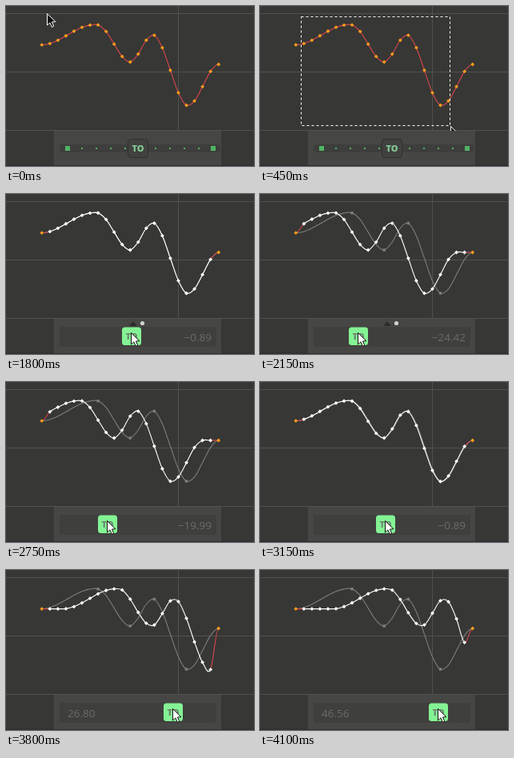
Write an HTML page with a canvas that moves like this. It is 310 by 200 pixels and loops after 4350 ms.

```html
<!DOCTYPE html>
<html lang="en">
<head>
<meta charset="utf-8">
<title>Time offset slider</title>
<style>
  html, body { margin: 0; width: 100%; height: 100%; overflow: hidden; background: #373735; }
  canvas { display: block; width: 310px; height: 200px; }
</style>
</head>
<body>
<canvas id="stage" width="310" height="200"></canvas>
<script>
const ctx = document.getElementById('stage').getContext('2d');
const LOOP = 4350, STEP = 50;
const SELECT = 900, MOVE = 1150, HOVER = 1250, PRESS = 1650, FREE = 2550;
const X0 = 44.8, GAP = 10.04, LAST = 22, CENTER = 165;
const RED = '#d8464c', ORANGE = '#f99d1c', WHITE = '#ffffff', BLACK = '#111111';
const GHOST = '#7c7c7a', GREEN = '#4fb464';
const FONT = '"Open Sans", "Noto Sans", sans-serif';

// Turning points of the curve: [key position, y]
const shape = [[0, 48.6], [6.4, 23.6], [6.9, 23.6], [11, 70], [13.8, 36], [18.2, 124.6], [22, 73]];
// Knob travel: [time, pixels from the centre]
const drag = [[1650, 0], [2150, -42], [2400, -48], [2550, -48], [2750, -38], [3500, 19], [4100, 58]];

const clamp = (v, lo, hi) => Math.min(hi, Math.max(lo, v));
const lerp = (a, b, u) => a + (b - a) * u;
const easeOut = (u, power) => 1 - (1 - clamp(u, 0, 1)) ** power;
const keyX = i => X0 + i * GAP;
const baseY = pos => track(shape, pos);

// Monotone cubic interpolation with resting ends
function track(keys, t) {
  const n = keys.length - 1;
  t = clamp(t, keys[0][0], keys[n][0]);
  let i = 0;
  while (i < n - 1 && t > keys[i + 1][0]) i++;
  const rate = k => (keys[k + 1][1] - keys[k][1]) / (keys[k + 1][0] - keys[k][0]);
  const slope = k => {
    if (k === 0 || k === n) return 0;
    const a = rate(k - 1), b = rate(k);
    return a * b <= 0 ? 0 : 2 * a * b / (a + b);
  };
  const [ta, a] = keys[i], [tb, b] = keys[i + 1], span = tb - ta;
  const u = (t - ta) / span, u2 = u * u, u3 = u2 * u;
  return a + (b - a) * (3 * u2 - 2 * u3) +
         span * (slope(i) * (u3 - 2 * u2 + u) + slope(i + 1) * (u3 - u2));
}

function curve(ys, from, to, color) {
  const slope = i => i <= 0 || i >= LAST ? 0 : (ys[i + 1] - ys[i - 1]) / 2;
  ctx.beginPath();
  ctx.moveTo(keyX(from), ys[from]);
  for (let i = from; i < to; i++) {
    ctx.bezierCurveTo(keyX(i + 1 / 3), ys[i] + slope(i) / 3,
                      keyX(i + 2 / 3), ys[i + 1] - slope(i + 1) / 3,
                      keyX(i + 1), ys[i + 1]);
  }
  ctx.strokeStyle = color;
  ctx.lineWidth = 1.1;
  ctx.stroke();
}

function polygon(x, y, points, fill) {
  ctx.beginPath();
  points.forEach(([dx, dy]) => ctx.lineTo(x + dx, y + dy));
  ctx.closePath();
  ctx.fillStyle = fill;
  ctx.fill();
}

function diamond(x, y, color) {
  const r = 2.4;
  polygon(x, y, [[0, -r], [r, 0], [0, r], [-r, 0]], color);
}

function arrow(x, y, fill, edge) {
  polygon(x, y, [[0, 0], [0, 14.5], [3.4, 11.4], [5.8, 16.8], [8.2, 15.7], [5.9, 10.5], [10.4, 10.2]], fill);
  ctx.strokeStyle = edge;
  ctx.lineWidth = 1;
  ctx.stroke();
}

function rect(x, y, w, h, color) {
  ctx.fillStyle = color;
  ctx.fillRect(x, y, w, h);
}

function rounded(x, y, w, h, r, fill, edge) {
  ctx.beginPath();
  ctx.roundRect(x, y, w, h, r);
  ctx.fillStyle = fill;
  ctx.fill();
  if (edge) {
    ctx.strokeStyle = edge;
    ctx.lineWidth = 1;
    ctx.stroke();
  }
}

function dot(x, y, r, color) {
  ctx.beginPath();
  ctx.arc(x, y, r, 0, 7);
  ctx.fillStyle = color;
  ctx.fill();
}

function text(str, x, y, style, color, align) {
  ctx.font = `${style} ${FONT}`;
  ctx.textAlign = align;
  ctx.fillStyle = color;
  ctx.fillText(str, x, y);
}

function drawGrid() {
  rect(0, 0, 310, 200, '#373735');
  [9, 82, 155].forEach(y => rect(0, y, 310, 1, '#51514f'));
  rect(215, 0, 1, 155, '#51514f');
}

function drawGraph(t, d, shift) {
  const base = Array.from({ length: LAST + 1 }, (_, i) => baseY(i));
  const inner = i => i > 0 && i < LAST;
  const ys = base.map((y, i) => inner(i) ? baseY(i - shift / 10) : y);
  if (d) {
    curve(base, 0, LAST, GHOST);
    [7, 11, 14, 18].forEach(i => dot(keyX(i), base[i], 2, GHOST));
  }
  curve(ys, 0, 1, RED);
  curve(ys, 1, LAST - 1, t >= SELECT ? WHITE : RED);
  curve(ys, LAST - 1, LAST, RED);
  ys.forEach((y, i) => diamond(keyX(i), y, t >= SELECT && inner(i) ? WHITE : ORANGE));
}

function drawRest(t) {
  rounded(67, 173, 201, 10, 4, '#3e3e3c');
  // Both halves mirror around the middle of the bar
  for (const side of [-1, 1]) {
    rect(165 + side * 91, 175, 6, 6, GREEN);
    for (let i = 1; i < 5; i++) rect(167 + side * (91 - i * 18), 177, 2, 2, GREEN);
  }
  rounded(152.5, 166.5, 25, 23, 4, '#414140', '#30302f');
  text('TO', CENTER, 182, '800 11px', t >= HOVER ? '#93d8a1' : '#84c893', 'center');
}

function drawDrag(d, value) {
  rounded(67, 166, 196, 25, 2, '#3f3f3d');
  const label = Math.abs(value).toFixed(2);
  if (value < 0) text('\u2212' + label, 257, 184, '13.5px', '#6c6c6a', 'right');
  if (value > 0) text(label, 77, 184, '13.5px', '#6c6c6a', 'left');
  rounded(CENTER + d - 12, 166.5, 24, 22.5, 3.5, '#84f394');
  text('TO', CENTER + d, 182, '800 11px', '#6a8870', 'center');
}

function drawPanel(t, d, value) {
  rect(0, 198, 310, 2, '#343036');
  rect(60, 156, 209, 43, '#464644');
  if (t >= PRESS) drawDrag(d, value);
  else drawRest(t);
  if (t >= HOVER && t < FREE) {
    polygon(159, 165, [[-5, 0], [0, -5.5], [5, 0]], '#2b2b2a');
    if (t >= PRESS) dot(170.5, 161.5, 2.6, '#d2d2d0');
  }
}

// Corner of the selection frame
function corner(t) {
  const u = (t - 50) / 600;
  return [Math.round(lerp(51, 258, easeOut(u, 2.12))), Math.round(lerp(13, 169, easeOut(u, 1.92)))];
}

function drawMarquee(t) {
  const [x, y] = corner(t);
  ctx.setLineDash([3, 3]);
  ctx.strokeStyle = WHITE;
  ctx.lineWidth = 1;
  ctx.strokeRect(51.5, 13.5, x - 52, y - 14);
  ctx.setLineDash([]);
}

function drawPointer(t, d) {
  if (t < PRESS) {
    const u = easeOut((t - MOVE) / 200, 2.66);
    const dip = 14 * Math.sin(Math.PI * u);
    arrow(lerp(257, 166, u) + 0.5, lerp(168, 173, u) + dip + 0.5, BLACK, WHITE);
  } else {
    arrow(CENTER + d - 0.5, 173.5, WHITE, BLACK);
  }
}

function draw(now) {
  const t = Math.floor((now % LOOP) / STEP) * STEP;
  const d = Math.round(track(drag, t));
  const value = Math.sign(d) * (d / 8.5) ** 2;
  // Offsets snap to whole keys until FREE
  const shift = t < FREE ? Math.round(value / 10) * 10 : value;
  drawGrid();
  drawGraph(t, d, shift);
  if (t < SELECT) {
    // The panel covers the pointer while selecting
    const [x, y] = t < 50 ? [51, 9] : corner(t);
    arrow(x + 0.5, y + 0.5, BLACK, WHITE);
  }
  drawPanel(t, d, value);
  if (t >= 50 && t < SELECT) drawMarquee(t);
  if (t >= SELECT) drawPointer(t, d);
}

const start = performance.now();
function tick() {
  draw(performance.now() - start);
  requestAnimationFrame(tick);
}
tick();
</script>
</body>
</html>
```
